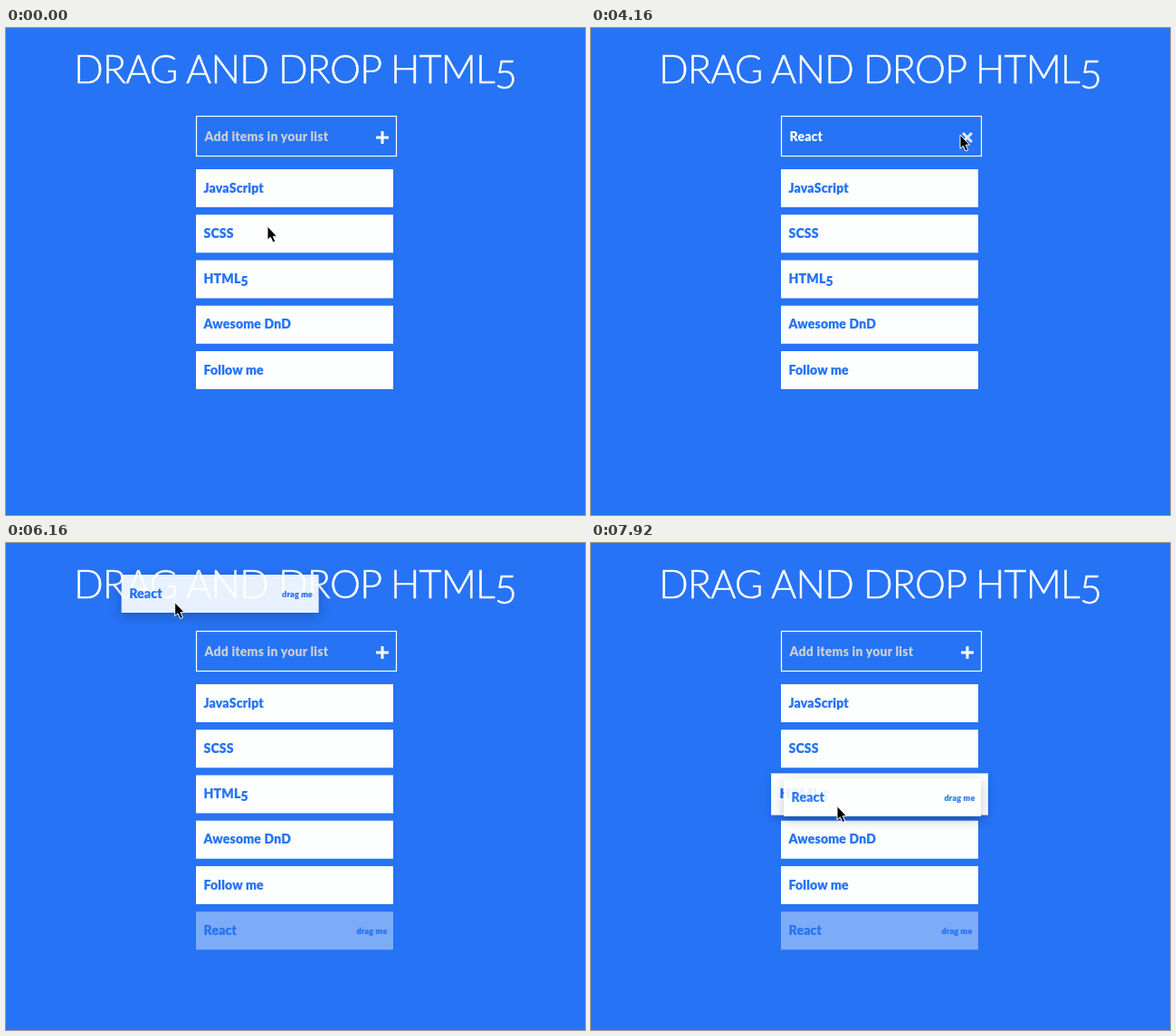
Write an HTML page that moves like this. It is 640 by 538 pixels and loops after 8000 ms.

```html
<!DOCTYPE html>
<html lang="en">
<head>
<meta charset="utf-8">
<title>Drag and drop list</title>
<style>
  html, body { margin: 0; height: 100%; overflow: hidden; background: #2673f5; }
  svg { display: block; width: 100%; height: 100%; }
  text { font: 900 14px Lato, sans-serif; letter-spacing: .2px; white-space: pre; }
  .title {
    font-size: 43px; font-weight: 300; letter-spacing: -.8px;
    fill: #fff; stroke: #fff; stroke-width: .5; text-anchor: middle;
  }
  .label { fill: #2673f5; stroke: #2673f5; stroke-width: .2; }
  .hint { font-size: 9px; text-anchor: end; }
  .target { filter: drop-shadow(0 4px 5px rgba(0, 0, 0, .12)); }
  .ghost { opacity: .9; filter: drop-shadow(0 4px 7px rgba(0, 0, 0, .25)); }
  .dragged { opacity: .4; }
</style>
</head>
<body>
<svg viewBox="0 0 640 538">
  <text class="title" x="319.5" y="60.5">DRAG AND DROP HTML<tspan dy="6">5</tspan></text>
  <rect x="210.5" y="97.5" width="221" height="44" fill="none" stroke="#fff" stroke-width="1.2"/>
  <text id="field" x="219.5" y="124.5"></text>
  <path id="caret" d="M0 112V128" stroke="#fff"/>
  <path id="plus" d="M-7 0H7M0 -7V7" stroke="#fff" stroke-width="3"/>
  <g id="list"></g>
  <path id="cursor" d="M0 0V15.2L3.4 12.2L6 18L8.8 16.8L6.3 11.2H10.6Z" stroke="#fff"/>
</svg>
<script>
const LOOP = 8000, LEFT = 210, TOP = 156, PITCH = 50.25, WIDTH = 218, HEIGHT = 42;
const NAMES = ['JavaScript', 'SCSS', 'HTML<tspan dy="2.5">5</tspan>', 'Awesome DnD', 'Follow me', 'React'];
const TYPED = 'React';

// Steps at which the user acts
const FOCUS = 6, TYPE = 10, TYPE_END = 15, ADD = 23, DRAG = 29;

// Each pointer move is a cubic curve that starts where the last one stopped.
const START = [289, 219];
const MOVES = [
  { from: 0, to: FOCUS, curve: [[420, 600], [640, -150], [253, 122.5]] },
  { from: 16, to: 21, curve: [[270, 90], [500, 95], [408, 118]] },
  { from: ADD, to: 28, curve: [[330, 200], [90, 480], [276, 445]] },
  { from: 28, to: 34, curve: [[150, 100], [165, -200], [272, 379]] },
  { from: 34, to: 40, curve: [[272, 338], [272, 300], [272, 290.5]] }
];

const [field, caret, plus, list, cursor] =
  ['field', 'caret', 'plus', 'list', 'cursor'].map(id => document.getElementById(id));

// The screen refreshes five times a second, on an 80 ms grid.
const stepAt = ms => Math.ceil((Math.floor(ms / 80) * 80 + 120) / 200) - 1;

const mix = (a, b, t) => a.map((v, i) => v + (b[i] - v) * t);

function bezier(points, t) {
  while (points.length > 1) points = points.slice(1).map((p, i) => mix(points[i], p, t));
  return points[0];
}

function pointerAt(step) {
  let position = START;
  for (const { from, to, curve } of MOVES) {
    if (step <= from) break;
    position = bezier([position, ...curve], Math.min(1, (step - from) / (to - from)));
  }
  return position;
}

function item(name, x, y, { kind = '', hint = false, scale = 1 } = {}) {
  const cx = WIDTH / 2, cy = HEIGHT / 2;
  return `<g class="${kind}" transform="translate(${x + cx} ${y + cy}) scale(${scale}) translate(${-cx} ${-cy})">
    <rect width="${WIDTH}" height="${HEIGHT}" fill="#fdfffe"/>
    <text class="label" x="8.5" y="25.5">${name}</text>
    ${hint ? '<text class="label hint" x="211.5" y="24.5">drag me</text>' : ''}</g>`;
}

function drawField(step, x, y) {
  const focused = step >= FOCUS && step < ADD;
  const count = focused ? Math.max(0, Math.floor((step - TYPE + 2) * .8)) : 0;
  field.textContent = count ? TYPED.slice(0, count) : 'Add items in your list';
  field.setAttribute('fill', count ? '#fff' : '#cbced6');

  // The caret blinks, but stays on while typing.
  const lastInput = step < TYPE ? FOCUS : Math.min(step, TYPE_END);
  const lit = focused && (step - lastInput) % 4 < 2;
  const end = count ? field.getComputedTextLength() : 0;
  caret.setAttribute('transform', `translate(${220 + end} 0)`);
  caret.setAttribute('visibility', lit ? 'visible' : 'hidden');

  const hovered = Math.hypot(x - 416, y - 121) < 12;
  plus.setAttribute('transform', `translate(416 121) rotate(${hovered ? 45 : 0})`);
  plus.setAttribute('opacity', hovered ? .85 : 1);
}

function drawList(step, x, y) {
  const dragging = step >= DRAG, last = NAMES.length - 1;
  const inside = step > 0 && x >= LEFT && x <= LEFT + WIDTH;
  const hover = inside ? Math.floor((y - TOP + 4) / PITCH) : -1;
  const shown = step >= ADD ? NAMES : NAMES.slice(0, last);
  let html = shown.map((name, i) => {
    const top = TOP + i * PITCH;
    if (!dragging) return item(name, LEFT, top, { hint: i === hover });
    if (i === last) return item(name, LEFT, top, { kind: 'dragged', hint: true });
    return item(name, LEFT, top, i === hover ? { kind: 'target', scale: 1.1 } : {});
  }).join('');
  if (dragging) html += item(NAMES[last], x - 59, y - 30.5, { kind: 'ghost', hint: true });
  list.innerHTML = html;
}

let drawn = -1;
function tick(now) {
  const step = stepAt(now % LOOP);
  if (step !== drawn) {
    drawn = step;
    const [x, y] = pointerAt(step);
    drawField(step, x, y);
    drawList(step, x, y);
    cursor.setAttribute('transform', `translate(${x} ${y})`);
  }
  requestAnimationFrame(tick);
}
tick(0);
</script>
</body>
</html>
```
